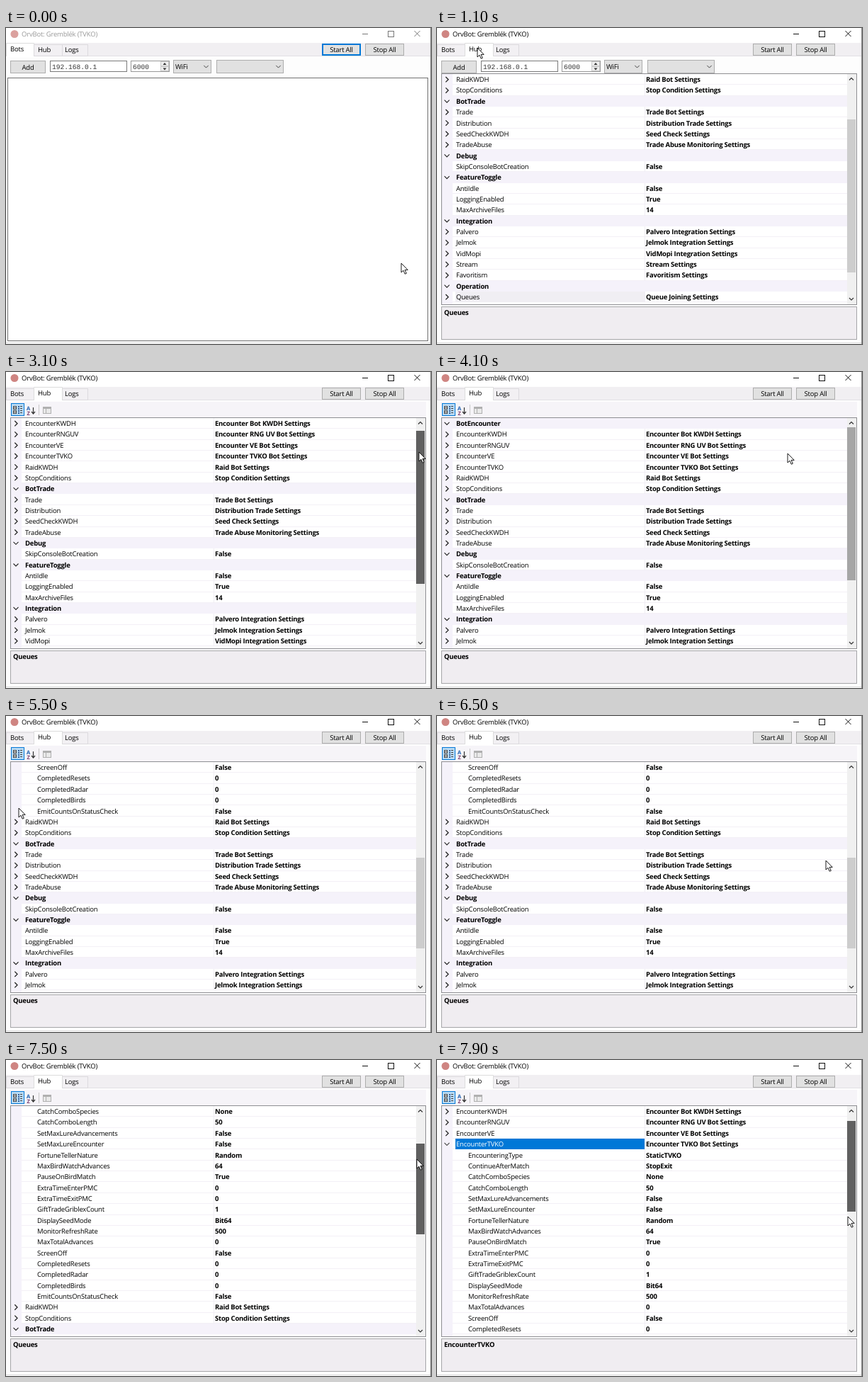
Recreate the animation shown at these times as an HTML page. Size 600x446 px, loop 8000 ms.

```html
<!DOCTYPE html>
<html lang="en">
<head>
<meta charset="utf-8">
<title>Bot settings</title>
<style>
html, body { margin: 0; width: 100%; height: 100%; overflow: hidden; background: #fff; }
svg { display: block; width: 100%; height: 100%; }
text { font: 9.5px "Open Sans", "Noto Sans", sans-serif; letter-spacing: -.2px; text-rendering: geometricPrecision; white-space: pre; }
text.b { font-weight: 700; letter-spacing: -.23px; }
text.az { font-size: 7.5px; }
text.mono { font: 9.6px "Liberation Mono", monospace; letter-spacing: 0; }
text.mid { text-anchor: middle; }
rect { shape-rendering: crispEdges; }
</style>
</head>
<body>
<svg viewBox="0 0 600 446" preserveAspectRatio="none">
  <g id="frame"></g>
  <g id="page"></g>
  <path id="cursor" d="M0 0V13L3 10.2L5.2 15.2L7.3 14.3L5.1 9.4H9.2Z" fill="#fff" stroke="#000" stroke-width=".9"/>
</svg>
<script>
const LOOP = 8000, STEP = 100;
const ROW_H = 15.35, TOP = 65, VISIBLE = 21, TOTAL = 29;
const TRACK_TOP = 78, TRACK_H = 298;
const ACTIVATE = 1000, SHOW_HUB = 1100, HUB_READY = 1200, EXPAND = 5400;
const PARENT = 4;
const $ = id => document.getElementById(id);

// "#" category, "+" expandable entry, "." child, blank for a plain entry
const closed = parse(`#BotEncounter
+EncounterKWDH|Encounter Bot KWDH Settings
+EncounterRNGUV|Encounter RNG UV Bot Settings
+EncounterVE|Encounter VE Bot Settings
+EncounterTVKO|Encounter TVKO Bot Settings
+RaidKWDH|Raid Bot Settings
+StopConditions|Stop Condition Settings
#BotTrade
+Trade|Trade Bot Settings
+Distribution|Distribution Trade Settings
+SeedCheckKWDH|Seed Check Settings
+TradeAbuse|Trade Abuse Monitoring Settings
#Debug
 SkipConsoleBotCreation|False
#FeatureToggle
 AntiIdle|False
 LoggingEnabled|True
 MaxArchiveFiles|14
#Integration
+Palvero|Palvero Integration Settings
+Jelmok|Jelmok Integration Settings
+VidMopi|VidMopi Integration Settings
+Stream|Stream Settings
+Favoritism|Favoritism Settings
#Operation
+Queues|Queue Joining Settings`);

const children = parse(`.EncounteringType|StaticTVKO
.ContinueAfterMatch|StopExit
.CatchComboSpecies|None
.CatchComboLength|50
.SetMaxLureAdvancements|False
.SetMaxLureEncounter|False
.FortuneTellerNature|Random
.MaxBirdWatchAdvances|64
.PauseOnBirdMatch|True
.ExtraTimeEnterPMC|0
.ExtraTimeExitPMC|0
.GiftTradeGriblexCount|1
.DisplaySeedMode|Bit64
.MonitorRefreshRate|500
.MaxTotalAdvances|0
.ScreenOff|False
.CompletedResets|0
.CompletedRadar|0
.CompletedBirds|0
.EmitCountsOnStatusCheck|False`);

const opened = [
  ...closed.slice(0, PARENT), { ...closed[PARENT], open: true },
  ...children, ...closed.slice(PARENT + 1)
];

function parse(src) {
  return src.split("\n").map(row => {
    const [name, value = ""] = row.slice(1).split("|");
    return { kind: row[0], name, value };
  });
}

// Thumb drags: scroll falls from a first row to zero
const drags = [
  { hover: 2300, press: 2500, start: 2600, span: 700, release: 3700, from: 5, pow: 1.8, x: 583, grip: 30 },
  { hover: 6600, press: 6700, start: 6700, span: 1350, release: LOOP, from: 20, pow: 1.25, x: 580, grip: 22 }
];

// Pointer legs: quadratic curves with an ease power
const legs = [
  { from: 0, to: 900, a: [558, 332], c: [690, 200], b: [57, 28], pow: 1 },
  { from: 1500, to: 1900, a: [57, 28], c: [290, 90], b: [538, 142], pow: 1 },
  { from: 3600, to: 4500, a: [583, 108], c: [342, 130], b: [102, 133], pow: 2.9 },
  { from: 4500, to: 5200, a: [102, 133], c: [50, 137], b: [18, 130], pow: .8 },
  { from: 5700, to: 6600, a: [18, 130], c: [460, 140], b: [580, 221], pow: 1 }
];

const clamp = v => Math.min(1, Math.max(0, v));

function scrollAt(t) {
  const open = t >= EXPAND, drag = drags[+open];
  const total = open ? TOTAL + children.length : TOTAL;
  const pos = drag.from * (1 - clamp((t - drag.start) / drag.span)) ** drag.pow;
  const pressed = t >= drag.press && t < drag.release;
  const near = t >= drag.hover && t < drag.release + 500;
  return {
    open, drag,
    first: Math.min(drag.from, Math.round(pos * 1.15)),
    thumb: Math.round(TRACK_TOP + pos / total * TRACK_H),
    size: Math.round(VISIBLE / total * TRACK_H),
    tone: pressed ? "#606060" : near ? "#a6a6a6" : "#cdcdcd"
  };
}

function pointerAt(t) {
  const { drag, thumb } = scrollAt(t);
  if (t >= drag.hover && t < drag.release - STEP) return [drag.x, thumb + drag.grip];
  const leg = legs.filter(l => l.from <= t).pop();
  const u = clamp((t - leg.from) / (leg.to - leg.from)) ** leg.pow, v = 1 - u;
  return leg.a.map((a, i) => Math.round(v * v * a + 2 * u * v * leg.c[i] + u * u * leg.b[i]));
}

const rect = (x, y, w, h, fill, line) => line
  ? `<rect x="${x + .5}" y="${y + .5}" width="${w - 1}" height="${h - 1}" fill="${fill}" stroke="${line}"/>`
  : `<rect x="${x}" y="${y}" width="${w}" height="${h}" fill="${fill}"/>`;
const text = (x, y, str, cls = "", fill = "#000") =>
  `<text x="${x}" y="${y}" class="${cls}" fill="${fill}">${str}</text>`;
const line = (d, color = "#333", width = 1) =>
  `<path d="${d}" fill="none" stroke="${color}" stroke-width="${width}"/>`;
const chevron = (x, y, s = 3.5, color, width) =>
  line(`M${x - s} ${y - s / 2}l${s} ${s}l${s} ${-s}`, color, width);
const button = (x, y, w, h, label) =>
  rect(x, y, w, h, "#e1e1e1", "#adadad") + text(x + w / 2, y + h / 2 + 3.6, label, "mid");

function tab(x, w, label, tx, on, hover) {
  return on
    ? rect(x, 21, w, 20, "#fff") + line(`M${x + .5} 40V21.5H${x + w - .5}V40`, "#dcdcdc") + text(tx, 33.3, label)
    : rect(x, 23, w, 17, hover ? "#d8eaf9" : "#f2f0f3", "#dcdade") + text(tx, 34.3, label);
}

function drawFrame(t) {
  const active = t >= ACTIVATE, ink = active ? "#111" : "#777";
  return rect(0, 0, 600, 446, "#fff")
    + `<circle cx="12" cy="8.5" r="5.5" fill="${active ? "#cf8582" : "#dba19e"}"/>`
    + text(22, 12, "OrvBot: Gremblék (TVKO)", "", active ? "#000" : "#999")
    + line("M503 8.5H511", ink) + rect(539, 4, 9, 9, "none", ink)
    + line("M576.5 4L584.5 12M584.5 4L576.5 12", ink)
    + rect(0, 21, 599, 18, "#f1eff2") + rect(0, 39, 599, 1, "#e2e0e4") + rect(0, 40, 599, 406, "#fdfdfd")
    + tab(0, 40, "Bots", 6, !active)
    + tab(78, 38, "Logs", 83, false)
    + tab(39, 41, "Hub", 45, active, t >= ACTIVATE - STEP)
    + button(446, 22, 55, 17, "Start All")
    + (active ? "" : `<rect x="447" y="23" width="53" height="15" fill="none" stroke="#0078d7" stroke-width="2"/>`)
    + button(507, 22, 55, 17, "Stop All")
    + rect(0, 444, 599, 1, "#d8d8d8") + rect(599, 0, 1, 446, "#8c8c8c");
}

function botBar() {
  const combo = (x, w, label) => rect(x, 45, w, 19, "#e1e1e1", "#adadad")
    + text(x + 3, 58.3, label) + chevron(x + w - 7.5, 54.5, 3.2, "#444");
  return button(6, 46, 50, 18, "Add")
    + rect(62, 46, 109, 16, "#fff", "#7a7a7a") + text(65, 57.5, "192.168.0.1", "mono", "#333")
    + rect(176, 46, 55, 16, "#fff", "#999") + text(179, 57.5, "6000", "mono", "#333")
    + rect(218, 47, 12, 7, "#eee", "#ccc") + rect(218, 54, 12, 7, "#eee", "#ccc")
    + `<path d="M221.5 52H226.5L224 49ZM221.5 56.5H226.5L224 59.5Z" fill="#333"/>`
    + combo(236, 54, "WiFi") + combo(297, 95, "");
}

function hubBar() {
  let s = rect(5, 42, 588, 22, "#f6f4f8") + rect(7, 44, 19, 18, "#b9daf3", "#0078d7");
  for (const y of [48, 54]) {
    s += rect(10, y, 5, 5, "#fff", "#444") + rect(11, y + 2, 3, 1, "#444");
    for (const dy of [0, 3]) s += rect(17, y + dy, 2, 2, "#345f9c") + rect(20, y + dy, 3, 1, "#444");
  }
  return s + text(29, 53.5, "A", "b az", "#1d5fae") + text(29.5, 61, "Z", "b az", "#7a3e70")
    + line("M38.5 50V58M36 56L38.5 59L41 56", "#333", 1.2)
    + rect(46, 46, 1, 15, "#c8c8c8")
    + rect(52, 49, 12, 10, "#e9e9e9", "#b0b0b0") + rect(52, 49, 12, 3, "#b0b0b0") + rect(56, 52, 1, 7, "#b0b0b0");
}

function drawRow(row, i, selected, focused) {
  const y = TOP + i * ROW_H, base = y + 11.1, mid = y + 7.7;
  const cat = row.kind === "#";
  let s = cat
    ? rect(7, y, 572, ROW_H, "#f5f2fa")
    : rect(22, y + ROW_H - 1, 557, 1, "#f3f0f6") + rect(293, y, 1, ROW_H, "#f0edf4");
  if (selected) s += rect(26, y, 267, ROW_H - .5, focused ? "#0078d7" : "#f0eef3");
  if (cat || row.open) s += chevron(14, mid, 3.5, row.open ? "#555" : "#222", 1.1);
  else if (row.kind === "+") s += line(`M12.3 ${mid - 3.7}l3.7 3.7l-3.7 3.7`, "#222", 1.3);
  return s
    + text(row.kind === "." ? 44 : 27, base, row.name, cat ? "b" : "", selected && focused ? "#fff" : "#000")
    + text(295, base, row.value, "b");
}

function grid(t) {
  const { open, first, thumb, size, tone } = scrollAt(t);
  const focused = open && first <= PARENT;
  const pick = focused ? closed[PARENT].name : "Queues";
  const body = (open ? opened : closed).slice(first, first + VISIBLE)
    .map((row, i) => drawRow(row, i, row.name === pick, focused)).join("");
  return rect(6, 64, 587, 327, "#fff") + rect(7, 65, 15, 325, "#f5f2fa") + body
    + rect(579, 65, 13, 325, "#f0f0f0") + rect(579, thumb, 12, size, tone)
    + line("M582 73.5L585 70.5L588 73.5", "#333", 1.2) + chevron(585, 382.5, 3, "#333", 1.2)
    + rect(6, 64, 587, 327, "none", "#8e8e92")
    + rect(6, 393, 587, 47, "#f0edf1", "#a5a5a8") + text(10, 404.8, pick, "b");
}

function drawPage(t) {
  if (t < SHOW_HUB) return botBar() + rect(2, 70, 594, 372, "#fff", "#707070");
  return (t < HUB_READY ? botBar() : hubBar()) + grid(t);
}

function draw(t) {
  $("frame").innerHTML = drawFrame(t);
  $("page").innerHTML = drawPage(t);
  $("cursor").setAttribute("transform", `translate(${pointerAt(t)})`);
  $("cursor").style.display = t >= 2000 && t < drags[0].hover ? "none" : "";
}

let shown = -1;
const start = performance.now();
function tick() {
  const now = Math.max(0, performance.now() - start) % LOOP;
  const t = Math.floor(now / STEP) * STEP;
  if (t !== shown) draw(shown = t);
  requestAnimationFrame(tick);
}
tick();
</script>
</body>
</html>
```
